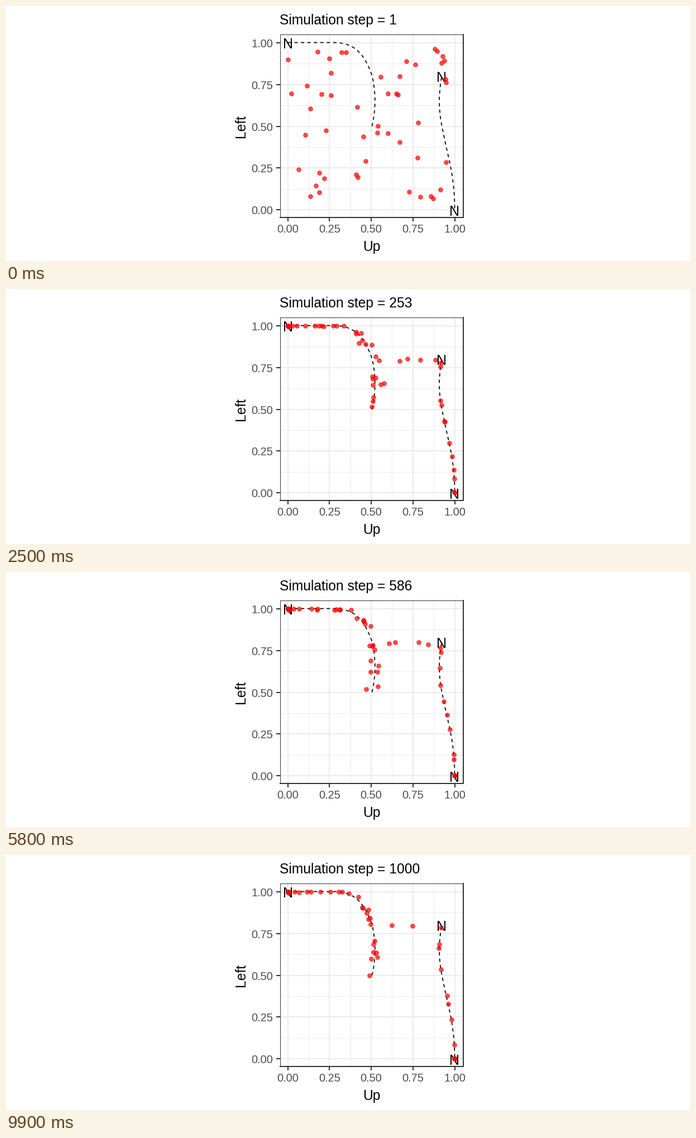
These frames come from a looping animation (1225 px wide and 457 px high, 10000 ms). A matplotlib script:

```python
import numpy as np
import matplotlib.pyplot as plt
from matplotlib.animation import FuncAnimation

W, H, DPI = 1225, 457, 100
FRAMES = 100
PX = 72 / DPI                      # points per pixel
INK, GREY, GRID = "#333333", "#4D4D4D", "#EBEBEB"
RED = (1, 0, 0, 0.7)
X0, X1, Y0, Y1 = 490, 818.5, 50, 378.5

plt.rcParams["font.family"] = "Liberation Sans"


def px(u):
    return 504 + 299 * u


def py(v):
    return 364.5 - 299 * v


def bezier(*ctrl, n=40):
    """Cubic curve through four control points."""
    a, b, c, d = np.array(ctrl, float)
    t = np.linspace(0, 1, n)[:, None]
    return ((1 - t)**3 * a + 3 * t * (1 - t)**2 * b
            + 3 * t**2 * (1 - t) * c + t**3 * d)


# Equilibrium branches, from the inner end to the corner
LEFT = np.vstack([bezier((655, 215), (663, 180), (661, 150), (655, 124)),
                  bezier((655, 124), (640, 82), (622, 65), (585, 65)),
                  [(504, 65)]])
RIGHT = np.vstack([bezier((779.5, 127.5), (773, 165), (775, 195), (783, 228)),
                   bezier((783, 228), (790, 268), (803, 300), (803, 364.5))])
SHELF = np.vstack([[(655, 126)], RIGHT])


def wander(rng, keep, *shape):
    """Mean-reverting unit noise, one row per frame."""
    z = rng.normal(size=(FRAMES,) + shape)
    for i in range(1, FRAMES):
        z[i] = keep * z[i - 1] + np.sqrt(1 - keep**2) * z[i]
    return z


def simulate(track, start, gain, along, across, rng):
    """Dots relax on to the track, then creep along it towards the corner."""
    n = len(start)
    arc = np.r_[0, np.cumsum(np.hypot(*np.diff(track, axis=0).T))]
    length = arc[-1]
    i = np.arange(FRAMES)[:, None]

    rank = (np.arange(n) + 0.5) / n
    reach = gain[0] + (gain[1] - gain[0]) * i / FRAMES
    home = length * np.minimum(1, rank * reach)
    calm = np.clip((length - home) / 90, 0.03, 1)
    s = np.clip(home + along * calm * wander(rng, 0.8, n), 0, length)

    on = np.stack([np.interp(s, arc, c) for c in track.T], -1)
    room = np.clip(1 - s / length, 0.12, 1)[..., None]
    on = on + across * room * wander(rng, 0.67, n, 2)
    pull = (1 - np.exp(-i / 2.6))[..., None]
    return start + pull * (on - start)


rng = np.random.default_rng(12)
u, v = rng.random((2, 50))
start = np.stack([px(u), py(v)], -1)[np.argsort(u)]
left = simulate(LEFT, start[:33], (1.12, 1.4), 12, 8, rng)
right = simulate(SHELF, start[33:], (0.97, 1.5), 12, 2, rng)
dots = np.concatenate([left, right], axis=1)
dots = np.clip(dots, (px(0), py(1)), (px(1), py(0)))

fig = plt.figure(figsize=(W / DPI, H / DPI), dpi=DPI, facecolor="white")
ax = fig.add_axes([0, 0, 1, 1])
ax.set_xlim(-0.5, W - 0.5)
ax.set_ylim(H - 0.5, -0.5)
ax.axis("off")


def line(x, y, color, width, z=1, **kw):
    ax.plot(x, y, color=color, lw=width * PX, zorder=z, **kw)


def text(x, y, label, size, color="black", **kw):
    return ax.text(x, y, label, fontsize=size * PX, color=color, **kw)


def grid(u, width):
    line([px(u)] * 2, [Y0, Y1], GRID, width)
    line([X0, X1], [py(u)] * 2, GRID, width)


for k in range(4):
    grid((k + 0.5) / 4, 1)

for k in range(5):
    u = k / 4
    grid(u, 2)
    line([px(u)] * 2, [Y1 + 1, Y1 + 7], INK, 2, solid_capstyle="butt")
    line([X0 - 7, X0], [py(u)] * 2, INK, 2, solid_capstyle="butt")
    text(px(u), 406, f"{u:.2f}", 20, GREY, ha="center")
    text(478, py(u) + 8, f"{u:.2f}", 20, GREY, ha="right")

for curve in (LEFT, RIGHT):
    line(*curve.T, "black", 1.7, 2, dashes=(3.5, 3.3), dash_capstyle="butt")

for x, y in ((504, 66), (779.5, 127), (802.5, 366)):
    text(x, y + 9, "N", 25, ha="center", zorder=3)

line([X0, X0, X1], [Y1, Y0, Y0], INK, 1, 5)
line([X0, X1, X1], [Y1, Y1, Y0], INK, 2, 5)

text(654, 439, "Up", 24.6, ha="center")
text(427, 214.5, "Left", 24.6, ha="center", rotation=90,
     rotation_mode="anchor")
title = text(490, 32, "", 24.6)

cloud = ax.scatter(*dots[0].T, s=(7.6 * PX)**2, facecolor=[RED],
                   edgecolor=[RED], linewidth=PX, zorder=4)


def update(i):
    step = round(1 + i * 999 / (FRAMES - 1))
    title.set_text(f"Simulation step = {step}")
    cloud.set_offsets(dots[i])
    return title, cloud


anim = FuncAnimation(fig, update, frames=FRAMES, interval=100,
                     init_func=lambda: update(0), repeat=True, repeat_delay=0)
plt.show()
```
